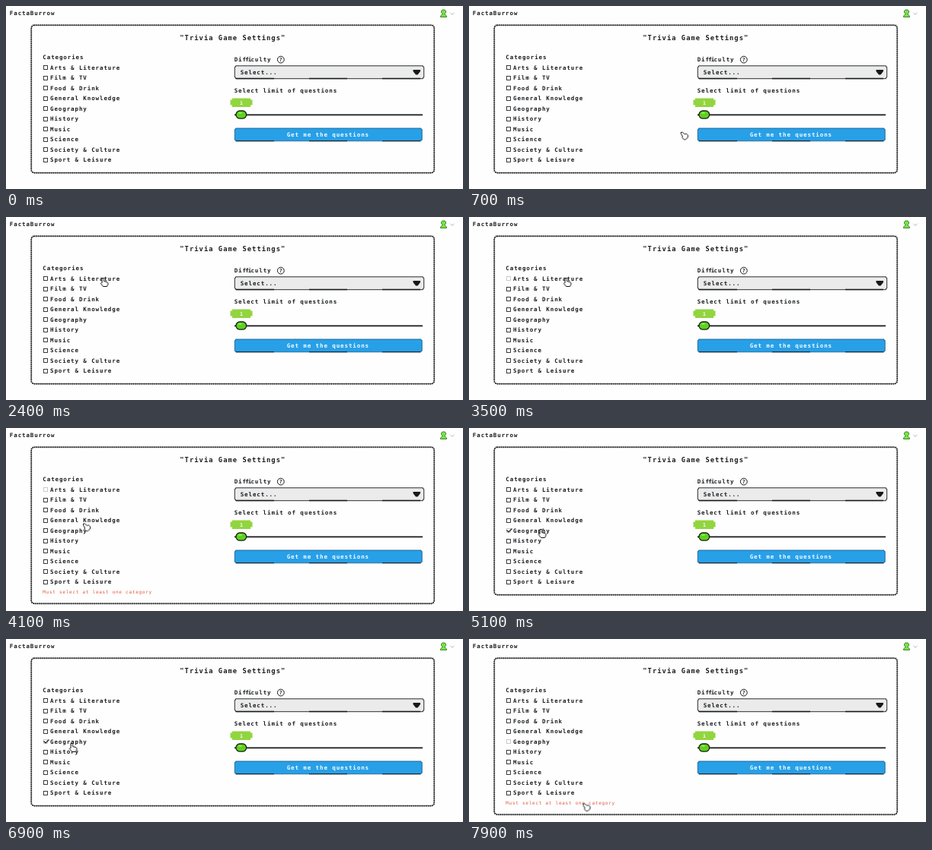
An HTML page that plays this animation: 600x241 px, repeating every 8000 ms.

```html
<!DOCTYPE html>
<html lang="en">
<head>
<meta charset="utf-8">
<title>Trivia Game Settings</title>
<style>
  html, body { margin: 0; width: 100%; height: 100%; overflow: hidden; background: #fefefe; }
  svg { display: block; width: 100vw; height: 100vh; }
  text { font: bold 7.5px "DejaVu Sans Mono", "Liberation Mono", monospace; letter-spacing: .12em; fill: #1b1d20; }
  .title { font-size: 8.75px; }
  .tight { letter-spacing: -.12em; }
  .light { fill: #f4faff; }
  .tiny { font-size: 6.5px; letter-spacing: 0; }
  .error { font-size: 6.04px; font-weight: normal; fill: #e2583e; }
  .line { fill: none; stroke: #16181a; }

  .frame, .error, .tick, .box, .hand, .arrow { animation: 8s step-end infinite; }
  .frame { height: 194.5px; animation-name: grow; }
  .error { animation-name: warn; }
  .first .tick { animation-name: tickFirst; }
  .first .box { animation-name: focusFirst; }
  .second .tick { animation-name: tickSecond; }
  .second .box { animation-name: focusSecond; }
  .tick { opacity: 0; }
  .box { fill: #fff; stroke: #25282c; stroke-width: .9; }
  .hand { animation-name: hand; }
  .arrow { animation-name: arrow; }
  .cursor { animation: move 8s linear infinite; }
  .cursor path { fill: #fff; stroke: #111; stroke-width: 1; }

  @keyframes grow {
    0%, 63.7% { height: 194.5px; }
    46.2%, 94.95%, 100% { height: 206px; }
  }
  @keyframes warn {
    0%, 63.7% { opacity: 0; }
    46.2%, 94.95%, 100% { opacity: 1; }
  }
  @keyframes tickFirst {
    0%, 43.7%, 100% { opacity: 0; }
    37.45% { opacity: 1; }
  }
  @keyframes tickSecond {
    0%, 92.45%, 100% { opacity: 0; }
    61.2% { opacity: 1; }
  }
  @keyframes focusFirst {
    0%, 61.2%, 100% { stroke: #25282c; }
    37.45% { stroke: #c3c5c8; }
  }
  @keyframes focusSecond {
    0% { stroke: #25282c; }
    61.2%, 100% { stroke: #c3c5c8; }
  }
  @keyframes hand {
    0%, 48.7%, 66%, 95.5%, 100% { opacity: 0; }
    16%, 55%, 82.5% { opacity: 1; }
  }
  @keyframes arrow {
    0%, 48.7%, 66%, 95.5%, 100% { opacity: 1; }
    16%, 55%, 82.5% { opacity: 0; }
  }
  @keyframes move {
    0%, 3.7% { transform: translate(338px, 246px); }
    3.75% { transform: translate(335px, 233px); }
    6.25% { transform: translate(316px, 208px); }
    12.5% { transform: translate(221px, 103px); }
    15% { transform: translate(150px, 88px); }
    17.5%, 20% { transform: translate(131px, 79.5px); }
    25%, 28.7% { transform: translate(131px, 80.5px); }
    30%, 48.7% { transform: translate(127.5px, 80px); }
    50% { transform: translate(118px, 106px); }
    51.25% { transform: translate(101px, 125.5px); }
    56.25% { transform: translate(94px, 133px); }
    63.75%, 65% { transform: translate(94.5px, 133px); }
    71.25% { transform: translate(128px, 205px); }
    76.25% { transform: translate(130px, 211px); }
    82.5% { transform: translate(89px, 146px); }
    83.75% { transform: translate(86px, 138px); }
    86.25%, 95% { transform: translate(86.5px, 137px); }
    98.75%, 100% { transform: translate(149.5px, 216.5px); }
  }
</style>
</head>
<body>
<svg viewBox="0 0 600 241" preserveAspectRatio="none">
  <!-- header -->
  <text x="4.8" y="12.2">FactaBurrow</text>
  <path d="M570.5 14.5v-1.500l2.500-2v-1l-1.500-1.300V6.500l1.500-1.500h3l1.500 1.500v2.200l-1.500 1.300v1l2.500 2v1.500z" fill="#7be24a" stroke="#2f7d1d" stroke-width=".9"/>
  <path class="line" d="M583.5 9l2.5 2.3 2.5-2.3" style="stroke:#b4b6b9"/>

  <!-- panel -->
  <rect class="frame line" x="33.2" y="25.2" width="529" rx="4" stroke-width=".7"/>
  <rect class="frame line" x="33.2" y="25.2" width="529" rx="4" stroke-width="1.9" stroke-dasharray="1.2 1.3"/>
  <text class="title" x="228.3" y="45">"Trivia Game Settings"</text>

  <text x="48.3" y="70">Categories</text>
  <g id="list"></g>
  <text class="error" x="48.2" y="217.5">Must select at least one category</text>

  <!-- difficulty -->
  <text x="299.7" y="73.2">Di<tspan class="tight">ffi</tspan>culty</text>
  <circle class="line" cx="360.8" cy="70.6" r="4.4"/>
  <text class="tiny" x="360.8" y="73" text-anchor="middle">?</text>
  <path d="M301.5 78.8H547.5v1.400h1.200V94h-1.200v1.700H301.5V94h-1.200V80.200h1.200z" fill="#ebebeb" stroke="#2a2c2f"/>
  <path class="line" d="M302 95.500H547.500" stroke-width="1.500" stroke-dasharray="50 46"/>
  <text x="307.7" y="89.800">Select...</text>
  <path d="M534.500 84h9.500v2l-3.500 4.500h-2.500l-3.500-4.500z" fill="#16181a"/>

  <!-- limit -->
  <text x="299.7" y="114.200">Select limit of questions</text>
  <path d="M297 121.500h24v2h2.500v7H321v2.500h-24v-2.500h-2.500v-7H297z" fill="#92d53f"/>
  <text class="tiny light" x="309" y="129.500" text-anchor="middle">1</text>
  <path class="line" d="M300 143.400H547" stroke-width="1.600"/>
  <rect x="302" y="138" width="13.600" height="10.200" rx="5" fill="#5fd022" stroke="#16240f" stroke-width="1.300"/>
  <path d="M305.500 140.200h4v1.500h-4z" fill="#a5f06c"/>

  <!-- button -->
  <path d="M301.500 161H545v1.400h1.200v14H545v1.400H301.500v-1.400h-1.200v-14h1.200z" fill="#27a0e8" stroke="#1d5e8c" stroke-width=".9"/>
  <path class="line" d="M302 177.700H545.500V161.500" stroke-width="1.100" stroke-dasharray="50 46"/>
  <text class="light" x="368.7" y="172.100">Get me the questions</text>

  <g class="cursor">
    <path class="hand" d="M-1.500 .5h2.500v4l4.500 1.300 .8 1v2.200l-1.300 2.500h-5l-3-4 1-1.200 .5 .4z"/>
    <path class="arrow" d="M.5 .5h2l3 2.500 1.800-.8 2.500 2.300-.5 3-3 2.500h-2l-2.300-2.500 .6-1.500-2.100-3.500z"/>
  </g>
</svg>
<script>
  const names = ["Arts & Literature", "Film & TV", "Food & Drink", "General Knowledge", "Geography",
    "History", "Music", "Science", "Society & Culture", "Sport & Leisure"];
  const roles = { 0: "first", 4: "second" };
  const list = document.getElementById("list");

  function add(parent, tag, attrs) {
    const node = document.createElementNS("http://www.w3.org/2000/svg", tag);
    for (const key in attrs) node.setAttribute(key, attrs[key]);
    return parent.appendChild(node);
  }

  names.forEach((name, i) => {
    const y = 81 + i * 13.53;
    const top = Math.round(y) - 2.5;
    const row = add(list, "g", { class: roles[i] || "row" });
    add(row, "rect", { class: "box", x: 49.5, y: top, width: 5, height: 5 });
    add(row, "text", { x: 58, y: y + 2.7 }).textContent = name;
    if (roles[i]) {
      add(row, "path", { class: "line tick", d: `M49.5 ${top + 2}l2.5 2.5 4.5-4.5`, "stroke-width": 1.2 });
    }
  });
</script>
</body>
</html>
```
